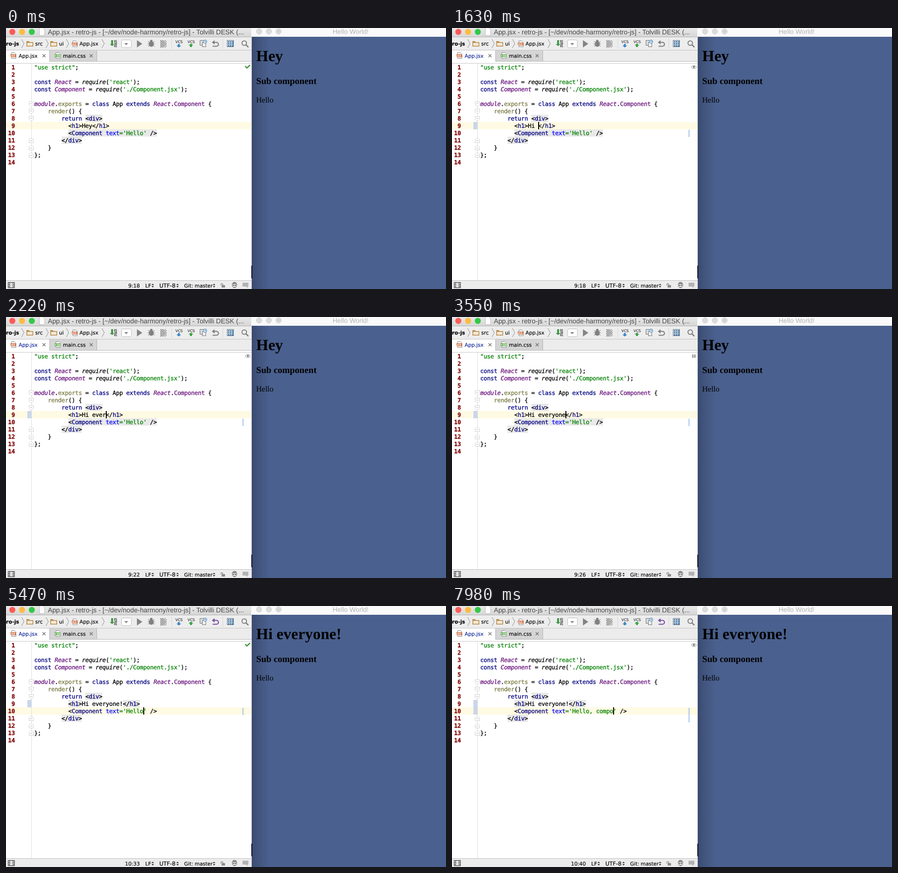
These frames come from a looping animation (904 px wide and 536 px high, 8000 ms). An HTML page:

```html
<!DOCTYPE html>
<html lang="en">
<head>
<meta charset="utf-8">
<title>Live reload</title>
<style>
html, body { margin: 0; width: 100%; height: 100%; overflow: hidden; background: #fff; }
svg { display: block; }
text { white-space: pre; text-rendering: geometricPrecision; }
text, tspan { fill: currentColor; }
.code, .code tspan { stroke: currentColor; stroke-width: .3px; }
.ui { stroke: currentColor; stroke-width: .15px; }
.code { font: 12px "DejaVu Sans Mono", monospace; letter-spacing: -.224px; }
.num { font-weight: bold; color: #800000; }
.ui { font: 10.6px "DejaVu Sans", sans-serif; }
.title { font: 13.75px "Liberation Sans", sans-serif; }
.page { font-family: "Liberation Serif", serif; }
.k { color: #000080; }
.v { color: #660e7a; font-style: italic; }
.p { color: #660e7a; }
.i { font-style: italic; }
.s { color: #008000; }
.o { color: #7a7a43; }
.b { color: #0000ff; }
.m { color: #c63fc6; }
</style>
</head>
<body>
<svg id="stage" width="904" height="536" viewBox="0 0 904 536">
  <defs>
    <linearGradient id="bar" x2="0" y2="1"><stop stop-color="#e9e9e9"/><stop offset="1" stop-color="#d6d6d6"/></linearGradient>
    <linearGradient id="shade"><stop stop-color="#3a4b70"/><stop offset=".3" stop-color="#41547d"/><stop offset="1" stop-color="#4a608e"/></linearGradient>
    <linearGradient id="thumb"><stop stop-color="#d9d9d9"/><stop offset="1" stop-color="#b4b4b4"/></linearGradient>
    <filter id="soft" x="-10%" y="-10%" width="120%" height="125%"><feGaussianBlur stdDeviation="5"/></filter>
    <clipPath id="list"><rect x="168" y="208" width="452" height="179"/></clipPath>
  </defs>
  <g id="base"></g>
  <g id="live"></g>
</svg>
<script>
const LOOP = 8000, CHAR = 7, LEFT = 58, ROW = 15;
const rowTop = n => 73 + ROW * (n - 1);
const colX = c => LEFT + CHAR * (c - 1);

const esc = s => s.replace(/&/g, '&amp;').replace(/</g, '&lt;').replace(/>/g, '&gt;');
const paint = s => esc(s).replace(/«(\w) (.*?)»/g, '<tspan class="$1">$2</tspan>');
const rect = (x, y, w, h, fill, extra = '') =>
  `<rect x="${x}" y="${y}" width="${w}" height="${h}" fill="${fill}" ${extra}/>`;
const circle = (x, y, r, fill, extra = '') => `<circle cx="${x}" cy="${y}" r="${r}" fill="${fill}" ${extra}/>`;
const shape = (d, fill) => `<path d="${d}" fill="${fill}"/>`;
const line = (d, color, w = 1) => `<path d="${d}" fill="none" stroke="${color}" stroke-width="${w}"/>`;
const text = (x, y, cls, s, extra = '') =>
  `<text x="${x}" y="${y}" class="${cls}" xml:space="preserve" ${extra}>${paint(s)}</text>`;

const fileIcon = (x, y, label, color) =>
  shape(`M${x + 2} ${y}h7l3 3v10h-10z`, '#fafafa') + line(`M${x + 2.5} ${y + .5}h6l3 3v9h-9z`, '#8d8d8d') +
  rect(x, y + 4, 12, 6, color) +
  text(x + .6, y + 9, 'ui', label, 'style="font-size:5.2px;font-weight:bold;color:#fff"');
const folder = x => shape(`M${x} 27h5l2 2h7v9h-14z`, '#b98a4a') + rect(x + 1.5, 30.5, 11, 6, '#f5ead6');
const chevron = x => line(`M${x} 23l5 9l-5 9`, '#8c8c8c');
const cross = x => line(`M${x - 3} 54l6 6m0 -6l-6 6`, '#6f6f6f', 1.4);
const spinner = x => shape(`M${x} 528l2.5 -3l2.5 3zM${x} 530l2.5 3l2.5 -3z`, '#333');
const arrow = (x, tip, dir, color) =>
  shape(`M${x} ${tip}l-5 ${-4 * dir}h3v${-3 * dir}h4v${3 * dir}h3z`, color);

function toolbar() {
  let s = rect(0, 18, 504, 28, '#ededed') + line('M0 18.5h504', '#b5b5b5') + line('M0 45.5h504', '#c4c4c4');
  s += text(0, 36, 'ui', 'ro-js', 'style="font-weight:bold"') + [32, 82, 124, 197].map(chevron).join('');
  s += folder(42) + text(60, 36, 'ui', 'src') + folder(91) + text(109, 36, 'ui', 'ui');
  s += fileIcon(135, 26, 'JSX', '#c9683c') + text(151, 36, 'ui', 'App.jsx');
  s += arrow(218, 37, 1, '#3f9a45') + rect(216, 25, 4, 6, '#3f9a45');
  ['01', '10', '01'].forEach((d, i) =>
    s += text(222, 29 + 5 * i, 'code', d, 'style="font-size:5.5px;color:#444"'));
  s += rect(237.5, 24.5, 20, 16, '#fff', 'rx="3" stroke="#bdbdbd"') + shape('M243 31h8l-4 4.5z', '#8a8a8a');
  s += shape('M269 25l11 7.5l-11 7.5z', '#848484');
  s += line('M292 27.5l13 10m-13 0l13 -10m-14 5h15', '#8c8c8c', 1.2) +
    '<ellipse cx="298.5" cy="33" rx="5" ry="5.5" fill="#808080"/>' + circle(298.5, 27, 2.7, '#808080');
  s += shape('M317 25h6l7 7.5l-7 7.5h-6z', '#c4c4c4');
  for (let y = 0; y < 7; y++) for (let x = 0; x < 6; x++)
    if ((x + y) % 2 === 0) s += rect(317 + 2.2 * x, 25 + 2.2 * y, 2, 2, '#8f8f8f');
  for (const x of [340.5, 445.5]) s += `<path d="M${x} 23v19" stroke="#aaa" stroke-dasharray="1 2"/>`;
  for (const x of [348, 373]) s += text(x, 31, 'ui', 'VCS', 'style="font-size:7.5px;color:#333"');
  s += arrow(355, 40, 1, '#3a86c4') + arrow(380, 32, -1, '#37a044');
  s += rect(398.5, 25.5, 8, 10, '#ddd', 'stroke="#777"') + rect(403.5, 29.5, 7, 9, '#eee', 'stroke="#777"') +
    circle(409, 28, 3.5, '#dcebf8', 'stroke="#3c7fb4"') + line('M409 26v2h2', '#3c7fb4');
  s += rect(454.5, 25.5, 13, 13, '#e8eef5', 'stroke="#5b6f85"');
  for (let i = 0; i < 9; i++) s += rect(456 + 4 * (i % 3), 27 + 4 * (i / 3 | 0), 3, 3, '#4a7ba6');
  return s + circle(489.5, 31, 4.7, 'none', 'stroke="#777" stroke-width="1.8"') + line('M493 34.5l5 5', '#777', 2.4);
}

function statusBar() {
  let s = rect(0, 518, 504, 18, '#ececec') + line('M0 518.5h504', '#c2c2c2');
  s += rect(4.5, 522.5, 13, 11, '#dedede', 'stroke="#333"') + line('M7.5 523v11m7 -11v11', '#444') +
    line('M4 526.5h4m-4 4h4m6 -4h4m-4 4h4', '#555');
  s += text(286, 533, 'ui', 'LF') + text(315, 533, 'ui', 'UTF-8', 'style="font-size:11.4px"');
  s += text(366, 533, 'ui', 'Git: master', 'style="font-size:10.4px"') + [299, 350, 425].map(spinner).join('');
  s += rect(443, 528, 7, 5, '#8a8a8a') + line('M441.5 529v-2a2 2 0 0 1 4 0v2', '#8a8a8a', 1.3);
  s += circle(469.5, 529, 4.5, '#f2f2f2', 'stroke="#777"') + shape('M465 525.5q0 -4 4.5 -4t4.5 4z', '#8a8a8a');
  s += line('M463.5 526h12', '#777') + rect(466, 528, 3, 2, '#666') + rect(470, 528, 3, 2, '#666') + line('M467 532.5h5', '#666');
  return s + shape('M487 523h10a1 1 0 0 1 1 1v6a1 1 0 0 1 -1 1h-1v3l-3 -3h-6a1 1 0 0 1 -1 -1v-6a1 1 0 0 1 1 -1', '#b3b3b3');
}

function base() {
  let s = rect(0, 0, 504, 18, 'url(#bar)');
  ['#fc5b57', '#fdbc40', '#34c84a'].forEach((c, i) => s += circle(13 + 20 * i, 8, 6.2, c));
  s += shape('M68 0h8l4 4v12h-12z', '#fdfdfd') + line('M68.5 0v15.5h11v-12l-3.5 -3.5', '#bcbcbc');
  s += text(86, 13, 'title', 'App.jsx - retro-js - [~/dev/node-harmony/retro-js] - Tolvilli DESK (...', 'color="#454545"');
  s += toolbar();
  s += rect(0, 46, 504, 26, '#ececec') + rect(0, 46, 89, 26, '#fff') + rect(90, 46, 96, 22, '#d5d5d5');
  s += rect(89, 69, 415, 3, '#fff') + line('M89.5 46v22m97 0v-22M89 68.5h415', '#b5b5b5');
  s += fileIcon(9, 50, 'JSX', '#c9683c') + fileIcon(100, 50, 'CSS', '#56a846');
  s += text(117, 61, 'ui', 'main.css') + cross(78) + cross(175);
  s += rect(0, 72, 504, 446, '#fff') + line('M0 72.5h504', '#c9c9c9');
  s += statusBar();
  s += rect(504, 0, 400, 18, '#fafafa') + rect(505, 18, 399, 518, '#4a608e') + rect(506, 18, 36, 518, 'url(#shade)');
  s += rect(504, 18, 1, 518, '#d4d6da') + rect(505, 18, 1, 518, '#36466a') + rect(504, 488, 2, 26, '#10141f');
  for (const x of [520, 540, 560]) s += circle(x, 7, 5.5, '#dcdcdc', 'stroke="#cfcfcf"');
  s += circle(560, 7, 2.5, '#cfcfcf');
  s += text(671, 12, 'title', 'Hello World!', 'style="font-size:13.6px;color:#b2b2b2"');
  s += text(514, 115, 'page', 'Sub component', 'font-size="18.72" font-weight="bold"');
  return s + text(514, 153, 'page', 'Hello', 'font-size="16"');
}

const source = (h, a) => [
  '«s "use strict"»;', '',
  "«k const» «v React» = «i require»(«s 'react'»);",
  "«k const» «v Component» = «i require»(«s './Component.jsx'»);", '',
  '«v module».«o exports» = «k class» App «k extends» «v React».«p Component» {',
  '    «o render»() {',
  '        «k return» <«k div»>',
  `          <«k h1»>${h}</«k h1»>`,
  `          <«k Component» «b text»«s ='${a}'» />`,
  '        </«k div»>',
  '    }',
  '};', ''
];

const icons = {
  check: line('M491.5 78.5l3.5 3.5l6.5 -6', '#4d9a4a', 2.6),
  eye: line('M491.5 80.5q5.5 -7 11 0q-5.5 6 -11 0z', '#8a8a8a') + circle(497, 80, 2, '#777'),
  pause: rect(494, 77, 2, 7, '#777') + rect(498, 77, 2, 7, '#777')
};

const words = 'each else export extends case continue false module private true while'.split(' ');

function popup() {
  let s = rect(168, 212, 464, 194, '#000', 'opacity=".3" filter="url(#soft)"');
  s += rect(167.5, 207.5, 465, 195, '#e8f1fe', 'stroke="#9aa3ae"') + rect(168, 208, 452, 17, '#9eb3c8');
  s += '<g clip-path="url(#list)">' + words.map((w, i) =>
    text(177, 221 + 17 * i, 'code', w.replace(/^e|e(?=\w?$)/, '«m e»'), 'color="#5c5c5c"')).join('') + '</g>';
  s += rect(620, 208, 12, 179, '#f4f4f4') + rect(620.5, 208.5, 10, 87, 'url(#thumb)', 'rx="2" stroke="#b5b5b5"');
  s += rect(168, 387, 464, 15, '#ececec') +
    text(169, 398, 'ui', 'Press ^. to choose the selected (or first) suggestion and insert a dot afterwards');
  s += text(600, 398, 'ui b', '>>', 'text-decoration="underline"');
  return s + rect(620, 387, 12, 15, '#d5e2f0') + text(622.5, 398, 'ui', 'π', 'color="#4a7fae"');
}

function fold(n) {
  const y = rowTop(n) + 8, d = n < 10 ? 1 : -1;
  return `<path d="M47.5 ${y - 4.5 * d}h9v${6 * d}l-4.5 ${4 * d}l-4.5 ${-4 * d}z" fill="#fff" stroke="#cfcfcf"/>` +
    line(`M50 ${y - .5 * d}h4`, '#b5b5b5');
}

function live(st) {
  const tag = (n, c, len) => n === st.row ? '' : rect(colX(c), rowTop(n), CHAR * len, ROW, '#e9e9e9');
  const hEnd = 15 + st.h.length, col = st.col;
  let s = rect(0, rowTop(st.row), 504, ROW, '#fffae3') + line('M52.5 73v445', '#dedede');
  if (st.marks) {
    s += rect(44, 193, 8, ROW * st.marks, '#c9d6ea') + rect(486, 209, 2, ROW * st.marks, '#a9c4ea');
  }
  s += [6, 7, 8, 11, 12, 13].map(fold).join('');
  s += tag(8, 16, 5) + tag(9, 11, 4) + tag(9, hEnd, 5) + tag(10, 11, 21 + st.a.length) + tag(11, 9, 6);
  source(st.h, st.a).forEach((l, i) => {
    const y = rowTop(i + 1) + 12;
    s += text(18.3, y, 'code num', String(i + 1), 'text-anchor="end"') + text(LEFT, y, 'code', l);
  });
  if (st.caret) s += rect(colX(col), rowTop(st.row), 2, ROW, '#000');
  s += text(26, 61, 'ui', 'App.jsx', `color="${st.marks ? '#0a2296' : '#000'}"`);
  s += text(275, 533, 'ui', `${st.row}:${col}`, 'text-anchor="end"');
  const undo = st.undo ? '#7b4ea3' : '#7d7d7d';
  s += line('M427 29.5h5.5a4 4 0 0 1 0 8h-8', undo, 2.2) + shape('M423 29.5l5.5 -4.5v9z', undo);
  s += icons[st.icon] + text(514, 68, 'page', st.out, 'font-size="32" font-weight="bold"');
  return s + (st.popup ? popup() : '');
}

// Each step lists only what changes at that time.
const steps = [
  [0, { h: 'Hey', a: 'Hello', out: 'Hey', row: 9, col: 18, icon: 'check' }],
  [150, { h: 'He', col: 17, caret: 1 }],
  [300, { h: 'H', col: 16 }],
  [890, { h: 'Hi', col: 17, icon: 'eye', marks: 1 }],
  [1330, { h: 'Hi ', col: 18, icon: 'pause' }],
  [1480, { icon: 'eye' }],
  [1920, { h: 'Hi e', col: 19, icon: 'pause' }],
  [2070, { popup: 1 }],
  [2220, { h: 'Hi ever', col: 22, icon: 'eye', popup: 0 }],
  [2660, { h: 'Hi every', col: 23 }],
  [2810, { h: 'Hi everyo', col: 24 }],
  [3100, { h: 'Hi everyon', col: 25 }],
  [3550, { h: 'Hi everyone', col: 26, icon: 'pause' }],
  [3690, { h: 'Hi everyone!', col: 27, icon: 'eye' }],
  [3990, { out: 'Hi everyone!' }],
  [4280, { icon: 'check' }],
  [4570, { caret: 0, undo: 1 }],
  [4720, { row: 10, caret: 1 }],
  [5170, { col: 34, caret: 0 }],
  [5470, { col: 33, caret: 1 }],
  [6210, { a: 'Hello,', col: 34, icon: 'pause', marks: 2 }],
  [6360, { a: 'Hello, ', col: 35, icon: 'eye' }],
  [6510, { a: 'Hello, c', col: 36 }],
  [6660, { a: 'Hello, co', col: 37 }],
  [6800, { a: 'Hello, com', col: 38 }],
  [7540, { a: 'Hello, comp', col: 39, icon: 'pause' }],
  [7690, { a: 'Hello, compo', col: 40, icon: 'eye' }]
];

const byId = id => document.getElementById(id);
byId('base').innerHTML = base();
let shown = -1;
const start = performance.now();

function tick() {
  const t = (performance.now() - start) % LOOP;
  const now = steps.filter(([at]) => at <= t).length;
  if (now !== shown) {
    shown = now;
    byId('live').innerHTML = live(Object.assign({}, ...steps.slice(0, now).map(([, change]) => change)));
  }
  requestAnimationFrame(tick);
}
tick();
</script>
</body>
</html>
```
